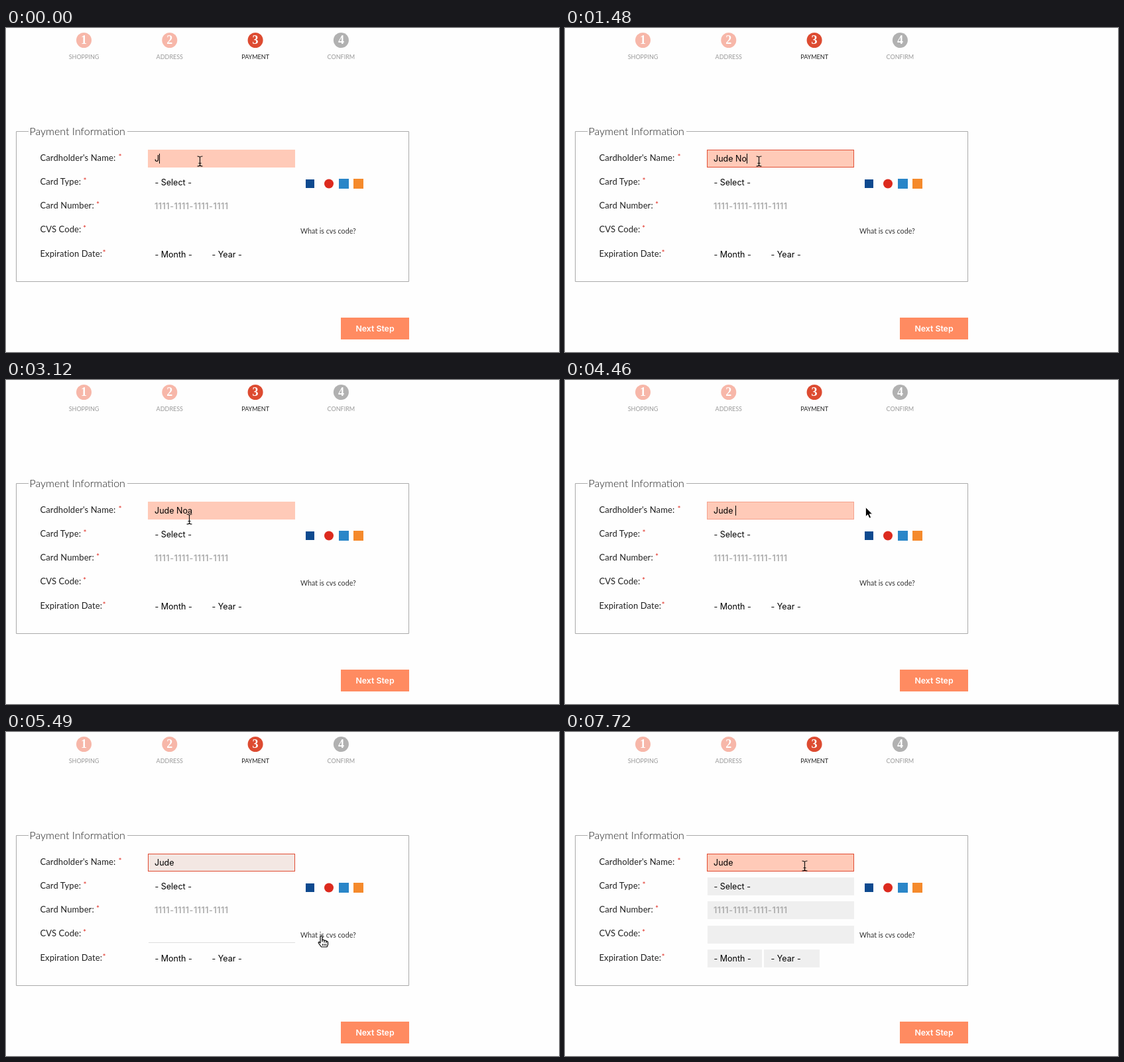
Write an HTML page that moves like this. It is 834 by 490 pixels and loops after 8 s.

```html
<!DOCTYPE html>
<html lang="en">
<head>
<meta charset="utf-8">
<title>Payment form</title>
<style>
  html, body { margin: 0; width: 100%; height: 100%; overflow: hidden; background: #fefefe; }
  svg { display: block; width: 834px; height: 490px; }
  text { white-space: pre; }
  .num { font: bold 18px "Liberation Serif", serif; fill: #fff; text-anchor: middle; }
  .step { font: 9px Lato, sans-serif; text-anchor: middle; }
  .legend { font: 300 16px Lato, sans-serif; fill: #222; }
  .label { font: 13px Lato, sans-serif; letter-spacing: .1px; fill: #222; }
  .star { font: 12px Lato, sans-serif; fill: #e02b20; text-anchor: middle; }
  .value { font: 12.5px Inter, sans-serif; fill: #000; }
  .hint { font: 600 12.5px Inter, sans-serif; letter-spacing: .5px; fill: #aaa; }
  .link { font: 10.7px Lato, sans-serif; fill: #333; }
  .next { font: 600 12.3px Inter, sans-serif; fill: #fff; text-anchor: middle; }
</style>
</head>
<body>
<svg viewBox="0 0 834 490">
  <g id="steps"></g>
  <path d="M34 156.500H15.500V383.500H607.500V156.500H183" fill="none" stroke="#aaa"/>
  <text class="legend" x="35.500" y="162">Payment Information</text>
  <g id="labels"></g>

  <g id="fields" fill="#efefef">
    <rect x="215" y="220" width="221" height="27"/>
    <rect x="215" y="256" width="221" height="27"/>
    <rect x="215" y="293" width="221" height="27"/>
    <rect x="215" y="329" width="82" height="27"/>
    <rect x="300" y="329" width="84" height="27"/>
  </g>
  <rect id="underline" x="215" y="318" width="221" height="1" fill="#ddd"/>
  <rect id="nameBox" x="214" y="184" width="222" height="27" fill="#efefef"/>
  <rect id="nameTint" x="214" y="184" width="222" height="27" fill="#ffcab8"/>
  <rect id="nameEdge" x="214.500" y="184.500" width="221" height="26" fill="none" stroke="#e04b32"/>

  <text id="name" class="value" x="224" y="202"></text>
  <rect id="caret" y="190" width="1" height="15"/>
  <text class="value" x="224.500" y="238">- Select -</text>
  <text class="hint" x="224" y="274">1111-1111-1111-1111</text>
  <text class="value" x="224.500" y="347">- Month -</text>
  <text class="value" x="310.500" y="347">- Year -</text>
  <text class="link" x="444" y="311">What is cvs code?</text>

  <rect x="452" y="229" width="13" height="13" fill="#0e4a8f"/>
  <circle cx="487" cy="235.500" r="7" fill="#dc2a1e"/>
  <rect x="502" y="228" width="15" height="15" fill="#2a86c8"/>
  <rect x="524" y="228" width="15" height="15" fill="#f58a2c"/>

  <rect x="505" y="438" width="103" height="33" fill="#ff8b61"/>
  <text class="next" x="556.500" y="459">Next Step</text>

  <g id="pointer">
    <path id="beam" fill="none" stroke="#111" stroke-width="1.200"
      d="M-4-7.500Q0-7.500 0-5.500Q0-7.500 4-7.500M0-5.500V5.500M-4 7.500Q0 7.500 0 5.500Q0 7.500 4 7.500M-2 3H2"/>
    <path id="arrow" fill="#000" stroke="#fff" stroke-width=".8"
      d="M0 0V14L3.200 11.200L5.500 16.500L8 15.500L5.700 10.300H10Z"/>
    <path id="hand" fill="#fff" stroke="#000" stroke-width="1.200" stroke-linejoin="round"
      d="M-1.500 1Q0-1 1.500 1V6Q4 5 4.500 7Q7 6 7.500 8Q10 7.500 10 10V13L8.500 16.500H0L-4 11Q-5 9-3 9L-1.500 10.500ZM1.500 6V9M4.500 7V10M7.500 8V10.500M2 12V14.500M4.500 12V14.500M7 12V14.500"/>
  </g>
</svg>
<script>
const LOOP = 8000, TICK = 148.3, LEAD = 10, BLINK = 465;
const NAME = "Jude Noa";
const typeEnd = 1584, eraseStart = 3770, eraseEnd = 4570;
const blurAt = 5040, focusAt = 6376, spaceAt = 7240;

// Spells of input as [start, end]; the caret blinks after each one.
const input = [[0, typeEnd], [eraseStart, eraseEnd], [focusAt, focusAt], [spaceAt, spaceAt]];

// Pointer stops: time, x, y.
const stops = [
  [2670, 292, 201], [3110, 276, 210], [3410, 276, 210], [4150, 453, 192], [4900, 453, 192],
  [5480, 474, 306], [5640, 488, 344], [6080, 361, 222], [6225, 361, 202]
];

const $ = id => document.getElementById(id);
const clamp = (v, lo, hi) => Math.min(hi, Math.max(lo, v));
const ramp = (t, from, length) => {
  const p = clamp((t - from) / length, 0, 1);
  return p * p * (3 - 2 * p);
};

function letters(t) {
  if (t < eraseStart) return Math.min(8, 1 + Math.floor(t / 240 + .4));
  if (t < spaceAt) return Math.max(4, 8 - Math.floor((t - eraseStart) / 200));
  return 5;
}

function caretShown(t) {
  if (t >= blurAt && t < focusAt) return false;
  const end = input.filter(([start]) => start <= t).pop()[1];
  return t < end || Math.floor((t - end) / BLINK) % 2 === 0;
}

function pointerAt(t) {
  const next = stops.findIndex(s => s[0] > t);
  if (next < 1) return (next ? stops[stops.length - 1] : stops[0]).slice(1);
  const a = stops[next - 1], b = stops[next], p = (t - a[0]) / (b[0] - a[0]);
  return [1, 2].map(i => Math.round(a[i] + (b[i] - a[i]) * p));
}

function shapeAt(x, y) {
  const inside = (l, top, r, bottom) => x >= l && x <= r && y >= top && y <= bottom;
  if (inside(444, 301, 528, 314)) return "hand";
  return [184, 256, 293].some(top => inside(214, top, 436, top + 27)) ? "beam" : "arrow";
}

function draw(t) {
  const [x, y] = pointerAt(t), shape = shapeAt(x, y);
  $("name").textContent = NAME.slice(0, letters(t));
  $("caret").setAttribute("x", Math.floor(224.3 + $("name").getComputedTextLength()));
  $("caret").style.opacity = +caretShown(t);
  // The edge turns red while the name is incomplete.
  $("nameEdge").style.opacity = ramp(t, 0, 750) - ramp(t, 1440, 340) + ramp(t, 4280, 450);
  $("nameTint").style.opacity = 1 - ramp(t, blurAt, 640) + ramp(t, focusAt - 75, 370);
  $("fields").style.opacity = ramp(t, 5490, 450);
  $("underline").style.opacity = +(shape === "hand");

  $("pointer").setAttribute("transform", `translate(${x + .5} ${y + .5})`);
  for (const id of ["beam", "arrow", "hand"]) $(id).style.display = id === shape ? "" : "none";
}

$("steps").innerHTML = ["SHOPPING", "ADDRESS", "PAYMENT", "CONFIRM"].map((name, i) => {
  const x = 117.5 + 129.3 * i;
  const disc = i < 2 ? "#f7b7a9" : i === 2 ? "#dd4b31" : "#b1b1b1";
  return `<circle cx="${x}" cy="18.500" r="11.500" fill="${disc}"/>
    <text class="num" x="${x}" y="24">${i + 1}</text>
    <text class="step" x="${x}" y="47" fill="${i === 2 ? "#222" : "#999"}">${name}</text>`;
}).join("");

$("labels").innerHTML = [
  ["Cardholder's Name:", 201, 172],
  ["Card Type:", 237, 119],
  ["Card Number:", 273, 138.5],
  ["CVS Code:", 309, 118.5],
  ["Expiration Date:", 346, 148]
].map(([name, y, star]) =>
  `<text class="label" x="51.500" y="${y}">${name}</text>
   <text class="star" x="${star}" y="${y - 2}">*</text>`).join("");

const start = performance.now();
function frame() {
  const t = (performance.now() - start) % LOOP;
  draw(Math.floor((t + LEAD) / TICK) * TICK);
  requestAnimationFrame(frame);
}
frame();
</script>
</body>
</html>
```
